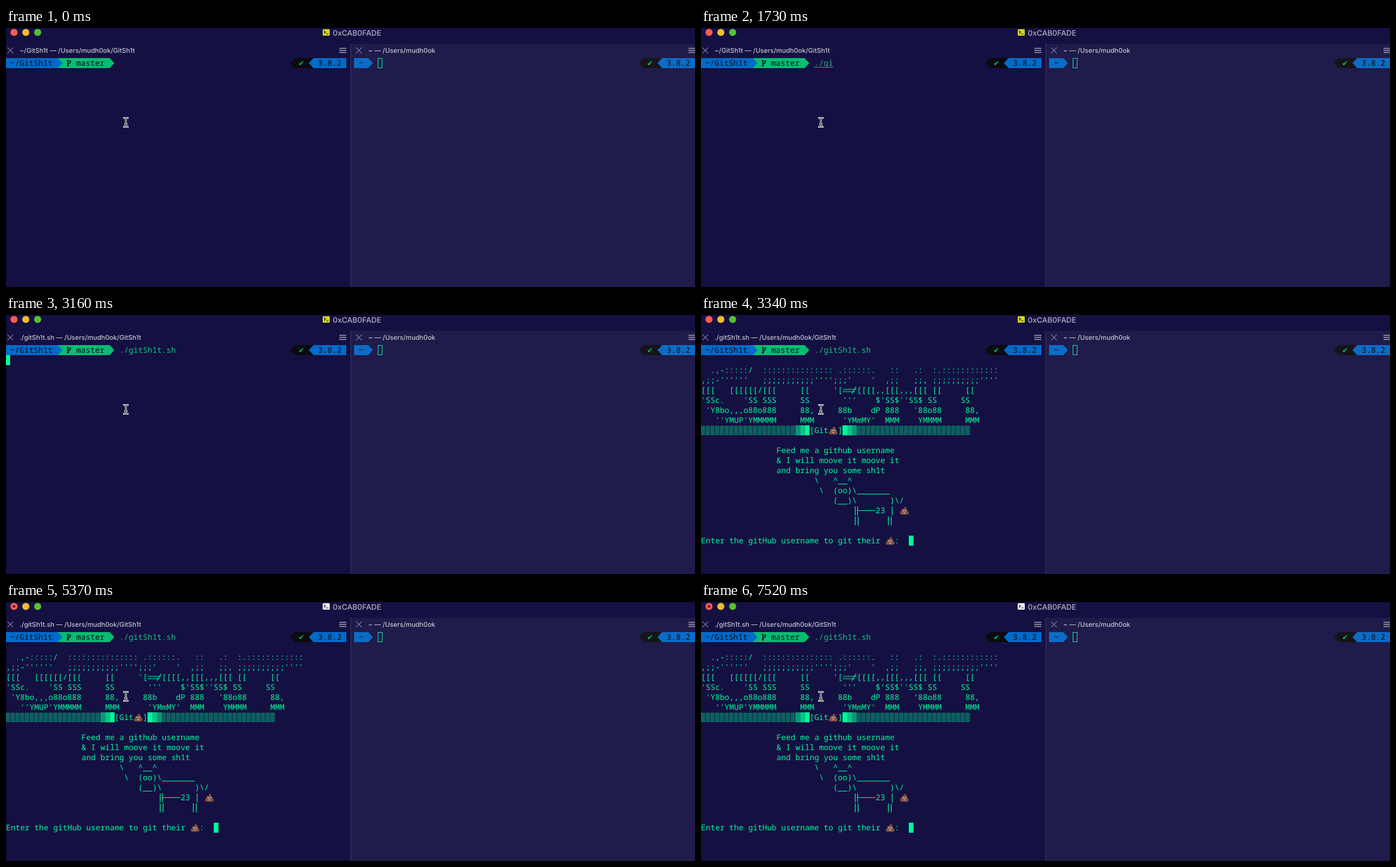
Write an HTML page that moves like this. It is 1164 by 439 pixels and loops after 8 s.

```html
<!DOCTYPE html>
<html lang="en">
<head>
<meta charset="utf-8">
<title>Terminal</title>
<style>
html, body { margin: 0; width: 100%; height: 100%; overflow: hidden; background: #151042; }
svg { display: block; width: 1164px; height: 439px; }
text { white-space: pre; text-rendering: geometricPrecision; }
.mono { font: 13.29px "Noto Sans Mono", monospace; }
.ui { font: 500 11.05px Inter, sans-serif; fill: #c6c4d2; }
.head { font: 500 12.7px Inter, sans-serif; fill: #b3b0bf; }
.tick { font: 12px "DejaVu Sans", sans-serif; fill: #06c46c; }
.art { fill: #00fa9a; }
#rows { font-weight: 500; }
.line { fill: none; stroke: #00fa9a; stroke-width: 1.2; }
.cmd { fill: #13c27d; }

.anim { animation: 8s step-end infinite; }
#caret { fill: #00ff9c; animation-name: caret; }
#typed { animation-name: typed; }
#reveal { animation-name: reveal; }
#under { animation-name: under; }
#full { animation-name: full; }
#output { animation-name: output; }
#idle { animation-name: idle; }
#running { animation-name: running; }
#edited { animation-name: edited; }
#icon { animation-name: icon; }

@keyframes caret {
  0% { opacity: 0; transform: translate(191.4px, 51px); }
  .62% { opacity: 1; transform: translate(199px, 51px); }
  1.74% { opacity: 1; transform: translate(207px, 51px); }
  13.37% { opacity: 1; transform: translate(215px, 51px); }
  14.12% { opacity: 1; transform: translate(223px, 51px); }
  21.62% { opacity: 0; transform: translate(223px, 51px); }
  23.87% { opacity: 1; transform: translate(295px, 51px); }
  34.37% { opacity: 0; transform: translate(295px, 51px); }
  38.87% { opacity: 1; transform: translate(-1px, 68px); }
  41.74% { opacity: 1; transform: translate(351px, 374px); }
  60.37% { opacity: 0; transform: translate(351px, 374px); }
  67.12% { opacity: 1; transform: translate(351px, 374px); }
  73.87% { opacity: 0; transform: translate(351px, 374px); }
  80.49% { opacity: 1; transform: translate(351px, 374px); }
  87.24% { opacity: 0; transform: translate(351px, 374px); }
  93.99%, 100% { opacity: 1; transform: translate(351px, 374px); }
}
@keyframes reveal {
  0% { width: 0; }
  .62% { width: 8px; }
  1.74% { width: 16px; }
  13.37% { width: 24px; }
  14.12%, 100% { width: 32px; }
}
@keyframes typed { 0% { opacity: 1; } 23.87%, 100% { opacity: 0; } }
@keyframes under { 0% { opacity: 0; } 2.87%, 100% { opacity: 1; } }
@keyframes full { 0% { opacity: 0; } 23.87%, 100% { opacity: 1; } }
@keyframes idle { 0% { opacity: 1; } 39.49%, 100% { opacity: 0; } }
@keyframes running { 0% { opacity: 0; } 39.49%, 100% { opacity: 1; } }
@keyframes output { 0% { opacity: 0; } 41.74%, 100% { opacity: 1; } }
@keyframes edited { 0% { opacity: 0; } 48.49%, 100% { opacity: 1; } }
@keyframes icon { 0% { fill: #d2d71d; } 48.49%, 100% { fill: #f1f0f5; } }
</style>
</head>
<body>
<svg viewBox="0 0 1164 439">
  <defs>
    <clipPath id="typing"><rect id="reveal" class="anim" x="191" y="51" width="0" height="17"/></clipPath>
    <pattern id="light" width="7.975" height="2" patternUnits="userSpaceOnUse">
      <rect width="7.975" height="2" fill="#00fa9a" opacity=".1"/>
      <rect width="6.800" height="1" fill="#00fa9a" opacity=".55"/>
    </pattern>
    <g id="poo">
      <path d="M8 2c3 1 4 2.500 3.500 4 1.500.5 2 2 1.200 3.300C14.500 10 15.500 11 15.300 13c-.2 2-2 2.500-4 2.500H4.700c-2 0-3.800-.5-4-2.500-.2-2 .8-3 2.600-3.700C2.500 8 3 6.500 4.700 6 7 5.200 8.200 4 8 2z" fill="#805040"/>
      <path d="M4.500 9.200q4 .8 7.500-.6M5 6.700q3 .5 5-1" fill="none" stroke="#5f382c" stroke-width=".6"/>
      <circle cx="6.200" cy="9" r="1.200" fill="#fff"/><circle cx="9.800" cy="9" r="1.200" fill="#fff"/>
      <circle cx="6.200" cy="9.100" r=".7" fill="#222"/><circle cx="9.800" cy="9.100" r=".7" fill="#222"/>
      <path d="M5.800 12h4.400q-2.200 2.200-4.400 0z" fill="#fff"/>
    </g>
    <path id="close" d="M2.500 33.200l9.600 9.600M12.100 33.200l-9.600 9.600" stroke="#85829a" stroke-width="1.100"/>
    <path id="menu" d="M563 34.500h12M563 38h12M563 41.500h12" stroke="#a3a1b0" stroke-width="1.500"/>
    <g id="status">
      <path d="M480 59.500l8-8.500h32v17h-32z" fill="currentColor"/>
      <path d="M511.500 59.500l8-8.500h55.500v17h-55.500z"/>
      <text class="tick" x="494" y="64">✔</text>
      <text class="mono" x="527" y="64" fill="#0b0a1c">3.8.2</text>
    </g>
    <path id="beam" d="M199.500 152.500q3 0 3 2.500v10q0 2.500-3 2.500M205.500 152.500q-3 0-3 2.500v10q0 2.500 3 2.500M201.500 163h2"/>
  </defs>

  <rect width="1164" height="439" fill="#151042"/>
  <rect x="583" y="27" width="581" height="412" fill="#1f1b4a"/>
  <path d="M582.500 27v412" stroke="#3c3963"/>

  <circle cx="13.500" cy="7.500" r="6" fill="#fb5c53"/>
  <circle cx="33.500" cy="7.500" r="6" fill="#ecbd2c"/>
  <circle cx="53.500" cy="7.500" r="6" fill="#56c034"/>
  <circle id="edited" class="anim" cx="13.500" cy="7.500" r="2.300" fill="#6d1110"/>
  <rect id="icon" class="anim" x="535" y="2" width="12" height="11" rx="1.500"/>
  <path d="M537.300 4.700l2.500 2.300-2.500 2.300M541 10h3.800" fill="none" stroke="#151042" stroke-width="1.200"/>
  <text class="head" x="552" y="12.500">0xCAB0FADE</text>

  <use href="#close"/><use href="#close" x="589"/>
  <use href="#menu"/><use href="#menu" x="590"/>
  <text id="idle" class="ui anim" x="23" y="42">~/GitSh1t — /Users/mudh0ok/GitSh1t</text>
  <text id="running" class="ui anim" x="23" y="42">./gitSh1t.sh — /Users/mudh0ok/GitSh1t</text>
  <text class="ui" x="612" y="42">~ — /Users/mudh0ok</text>

  <path d="M87 51h88l8 8.500-8 8.500h-88z" fill="#05bd72"/>
  <path d="M0 51h87.500l8 8.500-8 8.500h-87.500z" fill="#006bc9"/>
  <g class="mono" fill="#0b0a1c">
    <text x="7" y="64">~/GitSh1t</text>
    <text x="118.600" y="64">master</text>
  </g>
  <path d="M104.500 55v9M108.500 56v2q0 2-4 3.500" fill="none" stroke="#0b0a1c" stroke-width="1.500"/>
  <path d="M102.500 56l2-2.500 2 2.500zM106.500 57l2-2.500 2 2.500zM103 63h3v2h-3z" fill="#0b0a1c"/>
  <use href="#status" color="#0b0a10" fill="#006bc9"/>

  <path d="M588 51h24l8 8.500-8 8.500h-24z" fill="#0c6cc5"/>
  <text class="mono" x="596" y="64" fill="#0b0a1c">~</text>
  <rect x="628.500" y="51.500" width="7" height="16" fill="none" stroke="#14e6b0"/>
  <use href="#status" x="589" color="#15141a" fill="#0c6cc5"/>

  <g id="typed" class="anim"><g clip-path="url(#typing)">
    <text class="mono cmd" x="191.400" y="64">./gi</text>
    <path id="under" class="anim" d="M191 66.500h32" stroke="#13c27d"/>
  </g></g>
  <text id="full" class="mono cmd anim" x="191.400" y="64">./gitSh1t.sh</text>

  <g id="output" class="anim">
    <g id="rows" class="mono art"></g>
    <path class="line" d="M239.500 126h23M239.500 130h20M255 133.500l7-12"/>
    <path class="line" d="M260.500 324.500v15M264.500 324.500v15M264.500 331.500h30M323 324.500v15M260.500 341.500v15M265.500 341.500v15M316.500 341.500v15M321.500 341.500v15"/>
    <path d="M0 188h159.500v16H0zM263 188h192v16H263z" fill="url(#light)"/>
    <g class="art">
      <path d="M159.500 187h8v17h-8zM255 187h8v17h-8z" opacity=".58"/>
      <path d="M167.500 187h8v17h-8zM247 187h8v17h-8z" opacity=".78"/>
      <path d="M175.500 187h8v17h-8zM239 187h8v17h-8z"/>
    </g>
    <use href="#poo" x="215.500" y="187"/>
    <use href="#poo" x="335.500" y="323"/>
    <use href="#poo" x="311.500" y="374"/>
  </g>

  <rect id="caret" class="anim" width="8" height="17"/>
  <g fill="none" stroke-linecap="square">
    <use href="#beam" stroke="#fff" stroke-width="2.800"/>
    <use href="#beam" stroke="#08070f" stroke-width="1"/>
  </g>
</svg>
<script>
const CELL = 7.975, ROW = 17, TOP = 98;
const art = String.raw`  .,-:::::/  ::::::::::::::: .::::::.   ::   .:  :.::::::::::::
,;;-''''''   ;;;;;;;;;;;'''';;;'    '  ,;;   ;;, ;;;;;;;;;;''''
[[[   [[[[[[/[[[     [[     '[   [[[[,,[[[,,,[[[ [[     [[
'SSc.    'SS SSS     SS       '''    $'SS$''SS$ SS     SS
 'Y8bo,,,o88o888     88,     88b    dP 888   '88o88     88,
   ''YMUP'YMMMMM     MMM      'YMmMY'  MMM    YMMMM     MMM
                       [Git  ]

                Feed me a github username
                & I will moove it moove it
                and bring you some sh1t
                        \   ^__^
                         \  (oo)\_______
                            (__)\       )\/
                                     23


Enter the gitHub username to git their   :`;

const rows = document.getElementById("rows");
art.split("\n").forEach((line, i) => {
  // place each run of characters on the cell grid
  for (const run of line.matchAll(/\S+/g)) {
    const el = document.createElementNS("http://www.w3.org/2000/svg", "text");
    el.setAttribute("x", run.index * CELL);
    el.setAttribute("y", TOP + i * ROW);
    el.textContent = run[0];
    rows.append(el);
  }
});
</script>
</body>
</html>
```
